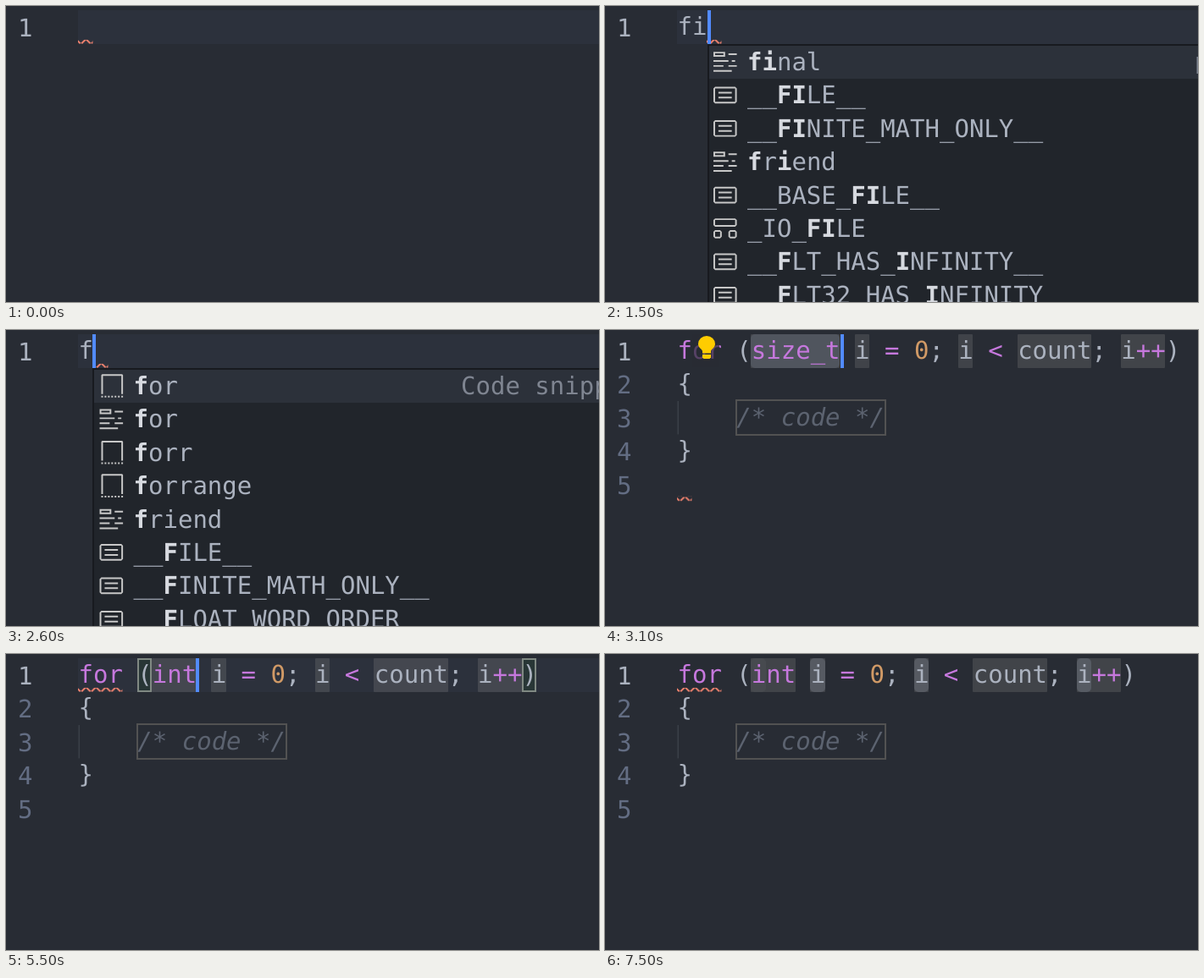
These frames come from a looping animation (700x350 px, 8 s). An HTML page:

```html
<!DOCTYPE html>
<html lang="en">
<head>
<meta charset="utf-8">
<title>Code editor</title>
<style>
  html, body { margin: 0; width: 100%; height: 100%; overflow: hidden; background: #282c34; }
  svg { display: block; width: 700px; height: 350px; }
  text {
    font: 29px "DejaVu Sans Mono", monospace;
    white-space: pre;
    text-rendering: geometricPrecision;
    fill: #abb2bf;
  }
  .key { fill: #c678dd; }
  .num { fill: #d19a66; }
  .note { fill: #5c6370; font-style: italic; }
  .dim { fill: #636d83; }
  .hit { fill: #d7dae0; font-weight: bold; }
  .info { fill: #7f8591; }
  .icon { fill: #c8c8c8; fill-rule: evenodd; }
</style>
</head>
<body>
<svg viewBox="0 0 700 350">
  <defs>
    <path id="keyword" d="M15 4h-5V3h5zM14 7h-2v1h2zM10 7H1v1h9zM12 13H1v1h11zM7 10H1v1h6zM15 10h-5v1h5zM8 2v3H1V2zM7 3H2v1h5z"/>
    <path id="constant" d="M4 6h8v1H4zM4 9h8v1H4zM1 4l1-1h12l1 1v8l-1 1H2l-1-1zM2 4v8h12V4z"/>
    <path id="struct" d="M2 2L1 3v3l1 1h12l1-1V3l-1-1zM2 3h12v3H2zM1 10l1-1h3l1 1v3l-1 1H2l-1-1zM2 10v3h3v-3zM10 10l1-1h3l1 1v3l-1 1h-3l-1-1zM11 10v3h3v-3z"/>
    <path id="snippet" d="M2.5 1L2 1.5V13h1V2h11v11h1V1.5L14.5 1zM2 14h1v1H2zM4 14h1v1H4zM6 14h1v1H6zM8 14h1v1H8zM10 14h1v1h-1zM12 14h1v1h-1zM14 14h1v1h-1z"/>
    <g id="bulb" fill="#fc0">
      <path d="M-5 27.5V25C-5 23-10 21-10 16.5A10 9.5 0 0 1 10 16.5C10 21 5 23 5 25V27.5Z"/>
      <path d="M-5 29H5V32.5L3.5 34H-3.5L-5 32.5Z"/>
    </g>
    <pattern id="wave" width="6" height="3" patternUnits="userSpaceOnUse">
      <path fill="#f4846f" d="M5.5 0L2.5 3H1.1L4.1 0zM4 0l2 2V.6L5.4 0zM0 2l1 1h1.4L0 .6z"/>
    </pattern>
  </defs>
  <g id="stage"></g>
</svg>
<script>
const LOOP = 8000, CHAR = 17.46, ROW = 39.4, LEFT = 85.5;
const stage = document.getElementById('stage');

// Asterisks enclose the matched letters.
const menus = {
  f: ['snippet *f*or', 'keyword *f*or', 'snippet *f*orr', 'snippet *f*orrange', 'keyword *f*riend',
    'constant __*F*ILE__', 'constant __*F*INITE_MATH_ONLY__', 'constant __*F*LOAT_WORD_ORDER__'],
  fi: ['keyword *fi*nal', 'constant __*FI*LE__', 'constant __*FI*NITE_MATH_ONLY__', 'keyword *f*r*i*end',
    'constant __BASE_*FI*LE__', 'struct _IO_*FI*LE', 'constant __*F*LT_HAS_*I*NFINITY__',
    'constant __*F*LT32_HAS_*I*NFINITY__'],
  fir: ['keyword *fri*end', 'constant __*F*LT_*R*AD*I*X__',
    ...['', '32', '64', '128', '32X', '64X'].map(n => `constant __*F*LT${n}_DENO*R*M_M*I*N__`)]
};

const steps = [
  { t: 0, text: '' },
  { t: 400, text: '', carets: [85] },
  { t: 900, text: '' },
  { t: 1300, text: 'f', carets: [102] },
  { t: 1400, text: 'f', carets: [102], menu: true, info: true },
  { t: 1500, text: 'fi', carets: [121], menu: true },
  { t: 1600, text: 'fir', carets: [137], menu: true },
  { t: 1800, text: 'fir', carets: [137], menu: true, bulb: 3 },
  { t: 2000, text: 'fir', menu: true, bulb: 3 },
  { t: 2300, text: 'fi', carets: [121], menu: true },
  { t: 2500, text: 'f', carets: [102], menu: true },
  { t: 2600, text: 'f', carets: [102], menu: true, info: true },
  { t: 2800, text: 'f', carets: [102], menu: true, info: true, bulb: 1 },
  { t: 3100, type: 'size_t', pick: 'type', carets: [278], bulb: 1 },
  { t: 3400, type: 'size_t', pick: 'type', carets: [278] },
  { t: 3600, type: 'size_t', pick: 'type' },
  { t: 4100, type: 'size_t', pick: 'type', carets: [278] },
  { t: 4600, type: 'size_t', pick: 'type' },
  { t: 5100, type: 'i', carets: [190] },
  { t: 5200, type: 'in', carets: [207] },
  { t: 5400, type: 'int', carets: [224] },
  { t: 5500, type: 'int', carets: [224], checked: true },
  { t: 6000, type: 'int', pick: 'name', carets: [260, 382, 575], checked: true },
  { t: 6100, type: 'int', pick: 'name', carets: [260, 382, 575], checked: true, match: true },
  { t: 6500, type: 'int', pick: 'name', checked: true, match: true },
  { t: 7000, type: 'int', pick: 'name', carets: [260, 382, 575], checked: true, match: true },
  { t: 7500, type: 'int', pick: 'name', checked: true, match: true }
];

const px = col => Math.round(85.15 + col * CHAR);
const esc = s => s.replace(/</g, '&lt;');
const rect = (x, y, w, h, fill, more = '') =>
  `<rect x="${x}" y="${y}" width="${w}" height="${h}" fill="${fill}" ${more}/>`;
const text = (x, y, body, cls = '') => `<text x="${x}" y="${y}" class="${cls}">${body}</text>`;
const span = (cls, s) => `<tspan class="${cls}">${esc(s)}</tspan>`;
const cells = (col, n, fill, more) => rect(px(col), 5, px(col + n) - px(col), 40, fill, more);
const outline = (x, y, w, h, color) =>
  rect(x + 1, y + 1, w - 2, h - 2, 'none', `stroke="${color}" stroke-width="2"`);
const squiggle = (col, n, row = 0) =>
  `<g transform="translate(${px(col)} ${39 + row * ROW}) scale(1.97)">${rect(0, 0, n * CHAR / 1.97, 3, 'url(#wave)')}</g>`;
const lineNumber = n => text(14, 36 + (n - 1) * ROW, n, n > 1 ? 'dim' : '');

function paint(code) {
  return code.split(/(\b(?:for|int|size_t)\b|\+\+|[=<]|0)/)
    .map((s, i) => i % 2 ? span(s === '0' ? 'num' : 'key', s) : esc(s)).join('');
}

function menu(word, info) {
  const x = LEFT + word.length * CHAR, edge = [0, 102, 121, 137][word.length];
  let out = rect(edge, 45, 700, 310, '#181a1f') + rect(edge + 2, 47, 700, 310, '#21252b')
    + rect(edge + 2, 47, 700, 39, '#2c313a');
  menus[word].forEach((item, i) => {
    const [icon, label] = item.split(' ');
    const body = label.split('*').map((s, k) => k % 2 ? span('hit', s) : s).join('');
    out += `<use href="#${icon}" class="icon" transform="translate(${x + 5.6} ${50.2 + i * ROW}) scale(1.97)"/>`
      + text(x + 47.6, 76 + i * ROW, body);
  });
  if (info) out += text(537, 76, 'Code snippet', 'info');
  if (word === 'fi') out += rect(698.5, 60, 1.5, 20, '#7f8591');
  return out;
}

function loopCode(s) {
  const n = s.type.length, name = 6 + n;
  const names = [name, name + 7, name + 18];
  const picked = s.pick === 'type' ? [[5, n]] : s.pick ? names.map(c => [c, 1]) : [];
  const stops = [[5, n], [name, 1], [name + 7, 1], [name + 11, 5], [name + 18, 3]];
  let out = picked.map(([c, k]) => cells(c, k, '#3e4451', 'rx="5"')).join('')
    + stops.map(([c, k]) => cells(c, k, '#7c7c7c', 'opacity=".3" rx="1"')).join('');
  if (s.match) out += [5, ...names].map(c => cells(c, 1, '#fff', 'opacity=".035" rx="5"')).join('');
  if (!s.pick) out += [4, name + 21].map(c =>
    cells(c, 1, '#006400', 'opacity=".1"') + outline(px(c), 5, 17, 40, '#808983')).join('');

  out += text(LEFT, 34, paint(`for (${s.type} i = 0; i < count; i++)`))
    + rect(85.5, 84, 1.5, 39.4, '#3b4048')
    + outline(154, 82, 178, 43, '#525252')
    + text(LEFT, 34 + ROW, '{')
    + text(LEFT + 4 * CHAR, 34 + 2 * ROW, '/* code */', 'note')
    + text(LEFT, 34 + 3 * ROW, '}')
    + [2, 3, 4, 5].map(lineNumber).join('');
  return out + (s.checked ? squiggle(0, 3) : squiggle(0, 1, 4));
}

function draw(s) {
  let out = s.pick ? '' : rect(85, 5, 615, 40, '#2c313c');
  out += lineNumber(1);
  out += s.type ? loopCode(s) : text(LEFT, 34, s.text) + squiggle(s.text.length, 1);
  if (s.bulb) {
    out += rect(px(s.bulb), 5, 32, 39, '#282c34', 'opacity=".7"')
      + `<use href="#bulb" x="${s.bulb === 1 ? 120 : 155}"/>`;
  }
  if (s.menu) out += menu(s.text, s.info);
  for (const x of s.carets || []) out += rect(x, 5, 4, 40, '#528bff');
  stage.innerHTML = out;
}

const start = performance.now();
let shown;
function tick() {
  const t = (performance.now() - start) % LOOP;
  const step = steps.findLast(s => s.t <= t);
  if (step !== shown) draw(shown = step);
  requestAnimationFrame(tick);
}
tick();
</script>
</body>
</html>
```
